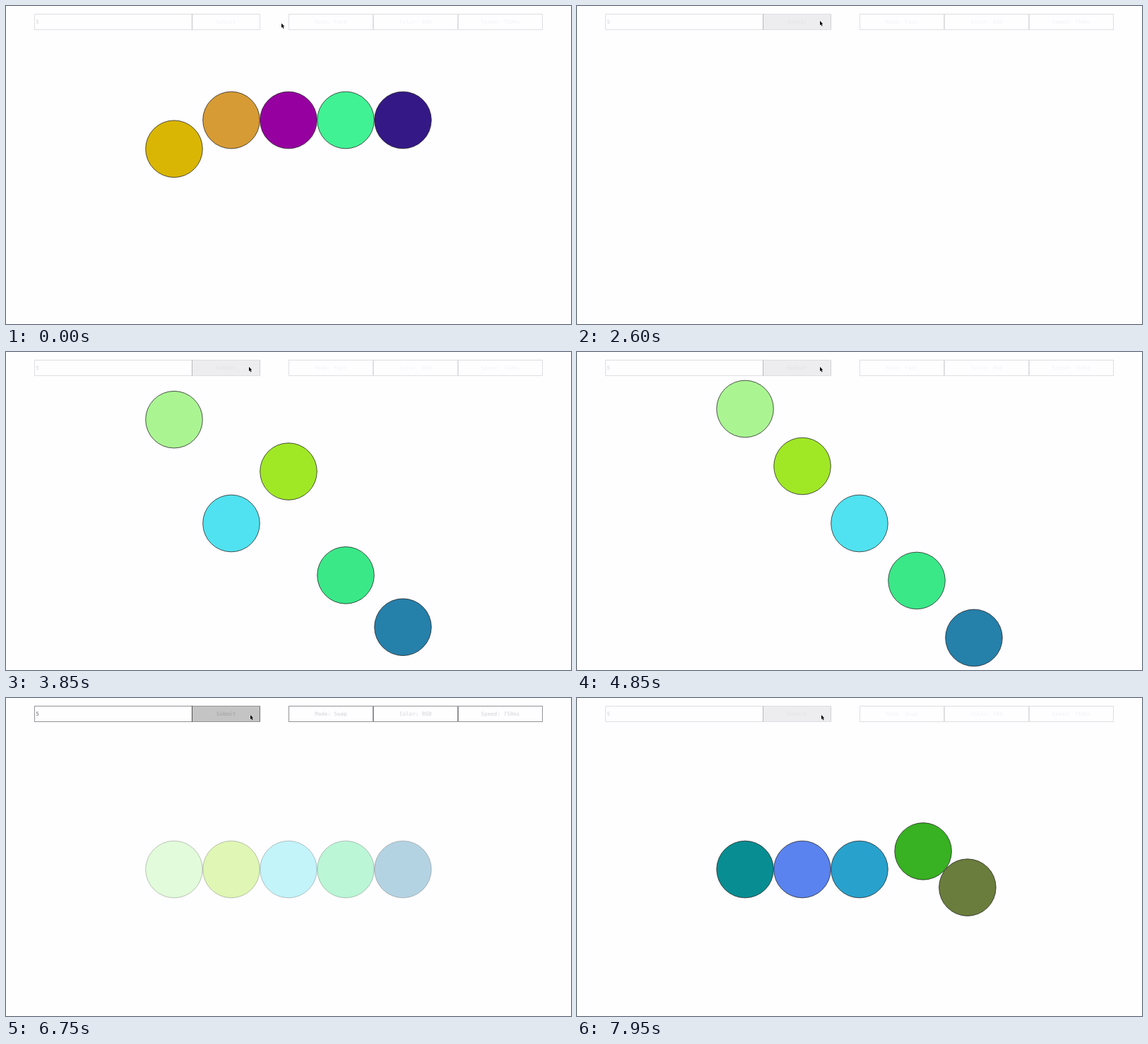
These frames come from a looping animation (800 px wide and 450 px high, 8 s). An HTML page with a canvas:

```html
<!DOCTYPE html>
<html lang="en">
<head>
<meta charset="utf-8">
<title>Color sorting</title>
<style>
  html, body { margin: 0; width: 100%; height: 100%; overflow: hidden; background: #fefdff; }
  canvas { display: block; width: 800px; height: 450px; }
</style>
</head>
<body>
<canvas id="stage" width="800" height="450"></canvas>
<script>
const ctx = document.getElementById('stage').getContext('2d');

const LOOP = 8000;
const STEP = 750;
const FADE = 375;
const GAP = 81;
const RADIUS = 40.3;
const MID_Y = 242.5;
const DIM = 0.12;
const PAPER = '#fefdff';

const PUSH_COLORS = ['#dab604', '#d79b35', '#9600a0', '#41f294', '#341886'];
const FAST_COLORS = ['#aaf592', '#50e2f0', '#a0e826', '#3ae888', '#2580aa'];
const SWAP_COLORS = ['#088e92', '#5a83ef', '#28a2cd', '#38b122', '#6a7d3c'];
const FAST_RANKS = [0, 2, 1, 3, 4];

// Pointer stops: time, x, y
const POINTER = [
  [0, 390, 24.5], [850, 390, 24.5], [1250, 422, 29], [1320, 422, 29],
  [1500, 438, 27], [1620, 438, 27], [2000, 344, 21], [5680, 344, 21],
  [6000, 432, 25], [6120, 432, 25], [6450, 346, 24], [8000, 346, 24]
];

const slotX = i => 238 + GAP * i;
const lerp = (a, b, p) => a + (b - a) * p;
const clamp = v => Math.min(1, Math.max(0, v));

// cubic-bezier(.25, .1, .25, 1)
function ease(p) {
  if (p <= 0) return 0;
  if (p >= 1) return 1;
  const curve = (a, b, s) => 3 * a * s * (1 - s) ** 2 + 3 * b * s * s * (1 - s) + s ** 3;
  let lo = 0, hi = 1;
  for (let i = 0; i < 24; i++) {
    const s = (lo + hi) / 2;
    if (curve(0.25, 0.25, s) < p) lo = s; else hi = s;
  }
  return curve(0.1, 1, lo);
}

const progress = (t, start, duration) => ease((t - start) / duration);

function circle(x, y, color, alpha = 1) {
  if (alpha <= 0) return;
  ctx.globalAlpha = alpha;
  ctx.beginPath();
  ctx.arc(x, y, RADIUS, 0, Math.PI * 2);
  ctx.fillStyle = color;
  ctx.fill();
  ctx.strokeStyle = '#1c1c1c';
  ctx.lineWidth = 0.75;
  ctx.stroke();
  ctx.globalAlpha = 1;
}

function drawPush(t) {
  const rise = progress(t, -169, 375);
  const settle = progress(t, 206, STEP);
  const alpha = 1 - progress(t, 2125, FADE);
  PUSH_COLORS.forEach((color, i) => {
    const top = i === 0 ? lerp(MID_Y + GAP, MID_Y - GAP, rise) : MID_Y - GAP;
    circle(slotX(i), lerp(top, MID_Y, settle), color, alpha);
  });
}

function drawFast(t) {
  const spread = progress(t, 3375, STEP) - progress(t, 4875, STEP);
  const shift = progress(t, 4125, STEP);
  const alpha = progress(t, 2820, 555) - progress(t, 6606, FADE);
  FAST_COLORS.forEach((color, i) => {
    const rank = FAST_RANKS[i];
    const x = slotX(lerp(i, rank, shift));
    circle(x, MID_Y + (rank - 2) * GAP * spread, color, alpha);
  });
}

function drawSwap(t) {
  const alpha = progress(t, 7220, 600);
  const angle = Math.PI * progress(t, 7826, STEP);
  const dx = Math.cos(angle) * GAP / 2;
  const dy = Math.sin(angle) * GAP / 2;
  const pivot = slotX(3.5);
  SWAP_COLORS.forEach((color, i) => {
    if (i < 3) circle(slotX(i), MID_Y, color, alpha);
    else {
      const side = i === 3 ? -1 : 1;
      circle(pivot + side * dx, MID_Y + side * dy, color, alpha);
    }
  });
}

function box(x, width) {
  ctx.strokeStyle = '#000';
  ctx.lineWidth = 1;
  ctx.strokeRect(x + 0.5, 11.5, width - 1, 22);
}

function button(x, width, label, hovered, disabled) {
  if (hovered) {
    ctx.fillStyle = '#757575';
    ctx.fillRect(x, 12, width, 21);
  }
  box(x, width);
  ctx.fillStyle = disabled ? 'rgba(16,16,16,.3)' : '#000';
  ctx.textAlign = 'center';
  ctx.fillText(label, x + width / 2, 25.2);
}

function drawControls(t) {
  const shown = progress(t, 956, FADE) - progress(t, 2125, FADE)
              + progress(t, 5625, FADE) - progress(t, 6606, FADE);
  const disabled = t < 956 || (t >= 2125 && t < 5625) || t >= 6606;
  const onMode = (t >= 1400 && t < 1700) || (t >= 5890 && t < 6220);
  const onSubmit = (t >= 1920 && t < 5760) || t >= 6380;
  const mode = t < 1560 ? 'Push' : t < 6060 ? 'Fast' : 'Swap';

  ctx.globalAlpha = lerp(DIM, 1, clamp(shown));
  ctx.font = 'bold 7.6px "DejaVu Sans Mono", monospace';
  box(40, 224);
  ctx.textAlign = 'left';
  ctx.fillStyle = '#000';
  ctx.fillText('5', 42.3, 25.2);
  button(263, 97, 'Submit', onSubmit, disabled);
  button(400, 120, 'Mode: ' + mode, onMode, disabled);
  button(520, 120, 'Color: RGB', false, disabled);
  button(640, 120, 'Speed: 750ms', false, disabled);
  ctx.globalAlpha = 1;
}

function drawPointer(t) {
  const next = Math.max(1, POINTER.findIndex(stop => stop[0] > t));
  const [t0, x0, y0] = POINTER[next - 1];
  const [t1, x1, y1] = POINTER[next];
  const p = clamp((t - t0) / (t1 - t0));
  const smooth = p * p * (3 - 2 * p);
  ctx.save();
  ctx.translate(lerp(x0, x1, smooth), lerp(y0, y1, smooth));
  ctx.beginPath();
  [[0, 0], [0, 6.2], [1.4, 5], [2.6, 7.6], [3.6, 7.1], [2.5, 4.6], [4.3, 4.4]]
    .forEach(([x, y]) => ctx.lineTo(x, y));
  ctx.closePath();
  ctx.strokeStyle = '#fff';
  ctx.lineWidth = 0.8;
  ctx.stroke();
  ctx.fillStyle = '#000';
  ctx.fill();
  ctx.restore();
}

function draw(t) {
  ctx.fillStyle = PAPER;
  ctx.fillRect(0, 0, 800, 450);
  drawControls(t);
  if (t < 2500) drawPush(t);
  else if (t < 7000) drawFast(t);
  else drawSwap(t);
  drawPointer(t);
}

let start;
function tick(now) {
  if (start === undefined) start = now;
  draw((now - start) % LOOP);
  requestAnimationFrame(tick);
}
draw(0);
requestAnimationFrame(tick);
</script>
</body>
</html>
```
